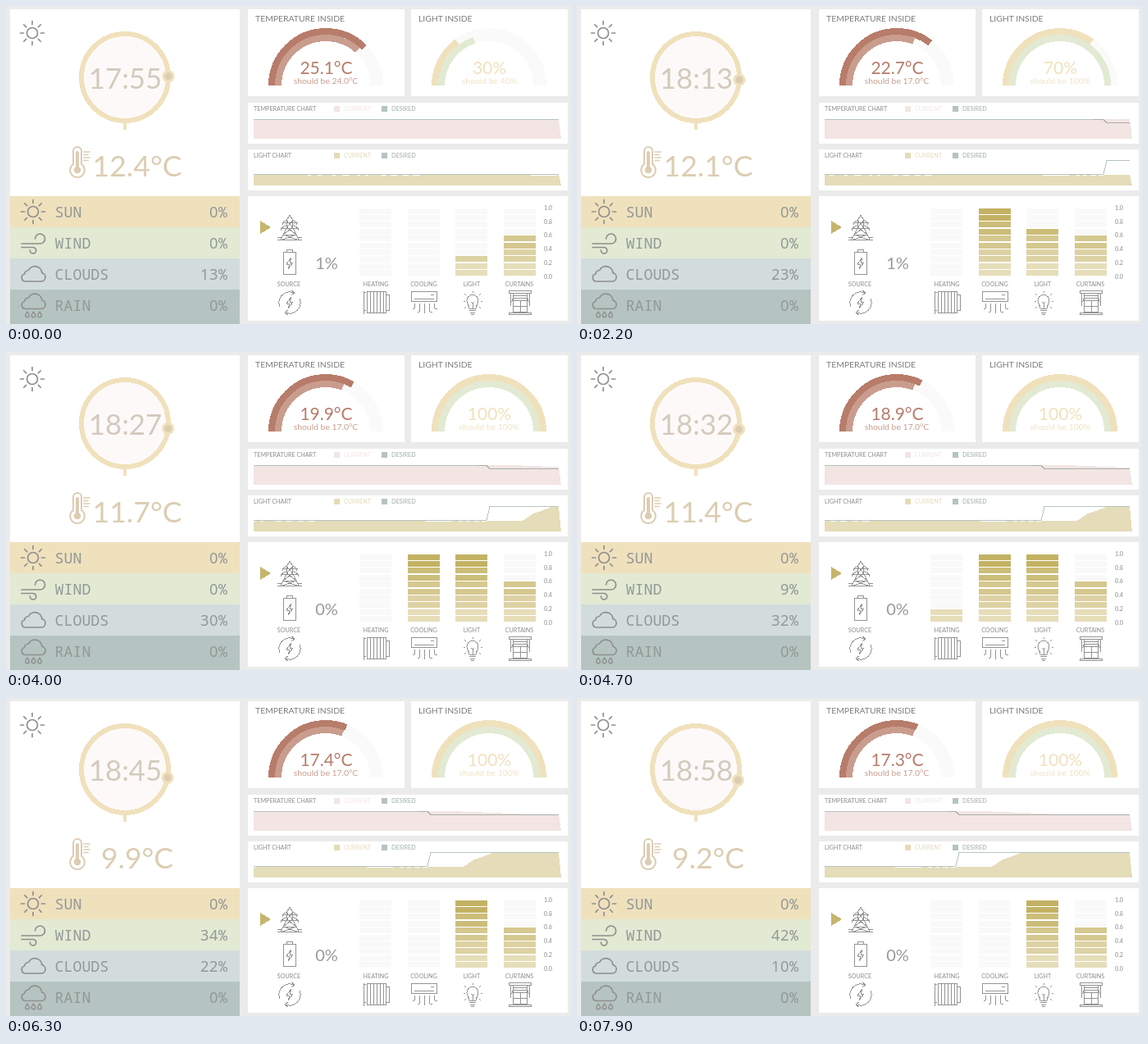
An HTML page that plays this animation: 689 by 388 pixels, repeating every 8000 ms.

```html
<!DOCTYPE html>
<html lang="en">
<head>
<meta charset="utf-8">
<title>Smart home dashboard</title>
<style>
html, body { margin: 0; width: 100%; height: 100%; overflow: hidden; background: #ebebeb; }
svg { display: block; width: 689px; height: 388px; }
text { font-family: Lato, "Open Sans", sans-serif; fill: #8c8c8c; }
.mid { text-anchor: middle; }
.title { font-size: 10.4px; fill: #7c7c7c; }
.big { font-size: 35.6px; text-anchor: middle; fill: #dccdb2; }
.value { font-size: 21px; text-anchor: middle; }
.note { font-size: 10.4px; text-anchor: middle; }
.small, .small text { font-size: 7.2px; }
.rows text { font: 18.3px "Noto Sans Mono", "DejaVu Sans Mono", monospace; fill: #929897; }
.rows .pct { text-anchor: end; }
.rows tspan { font-family: "Noto Sans", sans-serif; letter-spacing: .5px; }
.flat { shape-rendering: crispEdges; }
.icon { fill: none; stroke: #8f8f8f; stroke-width: 1.7; stroke-linecap: round; stroke-linejoin: round; }
.thin { stroke: #949494; stroke-width: 1; }
.arc { fill: none; stroke-width: 8; }
.line { fill: none; stroke: #b5c4c0; stroke-width: 1; mix-blend-mode: multiply; }
</style>
</head>
<body>
<svg viewBox="0 0 689 388">
  <defs>
    <clipPath id="plot"><rect x="302" y="120" width="372" height="104"/></clipPath>
    <path id="outer" d="M-66 0A66 66 0 0 1 66 0" pathLength="100"/>
    <path id="inner" d="M-58 0A58 58 0 0 1 58 0" pathLength="100"/>
    <path id="cloud" d="M24 336H43a5.2 5.2 0 0 0 .8-10.3A8.6 8.6 0 0 0 27.5 322.5A5.5 5.5 0 0 0 22.5 327A4.6 4.6 0 0 0 24 336Z"/>
    <path id="drop" d="M0-3.5C1-1.5 2.3-.5 2.3 1A2.3 2.3 0 0 1-2.3 1C-2.3-.5-1-1.5 0-3.5Z"/>
    <path id="bolt" d="M2-7L-4 1H0L-2 7L4-1H0Z"/>
    <g id="sun">
      <circle r="6.5"/>
      <path id="rays" d="M0-10.5V-14.5M0 10.5V14.5M-10.5 0H-14.5M10.5 0H14.5"/>
      <use href="#rays" transform="rotate(45)"/>
    </g>
  </defs>

  <g class="flat" fill="#fff">
    <path d="M5 4H285V388H5ZM295 4H486V110H295ZM494 4H685V110H494Z"/>
    <path d="M295 118H685V168H295ZM295 175H685V225H295ZM295 232H685V384H295Z"/>
    <path fill="#f0e1bd" d="M5 232H285V270H5Z"/>
    <path fill="#e2ead3" d="M5 270H285V308H5Z"/>
    <path fill="#d2dcdd" d="M5 308H285V346H5Z"/>
    <path fill="#b5c4c0" d="M5 346H285V388H5Z"/>
  </g>

  <!-- clock and weather -->
  <g class="icon"><use href="#sun" x="32" y="33"/></g>
  <g class="flat">
    <path d="M145 141V151" stroke="#f0e1bc" stroke-width="4"/>
    <circle cx="145" cy="87" r="53" fill="#fef9f9" stroke="#f0e1bc" stroke-width="6"/>
  </g>
  <g id="marker">
    <circle r="7.5" fill="#f0e1bc"/>
    <circle r="4.5" fill="#dccdb2"/>
  </g>
  <text id="clock" class="big" x="145.5" y="100.5" style="fill:#d3cabd;font-size:34.8px"></text>
  <g class="icon" style="stroke:#dccdb2">
    <path d="M82 193V177a5 5 0 0 1 10 0V193a8.8 8.8 0 1 1-10 0Z" stroke-width="2"/>
    <path d="M95 178H102M95 181.5H100M95 185H102M95 188.5H100"/>
    <path d="M87 179V198" stroke-width="4"/>
    <circle cx="87" cy="200" r="3.5" fill="#dccdb2"/>
  </g>
  <text id="outside" class="big" x="160" y="207.5"></text>

  <g class="icon">
    <use href="#sun" x="33" y="251"/>
    <path d="M19 290H41.5a6 6 0 1 0-6-6M19 294.5H33a3.7 3.7 0 1 1-3.7 3.7"/>
    <use href="#cloud"/>
    <use href="#cloud" y="33.5"/>
    <g stroke-width="1.4">
      <use href="#drop" x="26" y="376.5"/>
      <use href="#drop" x="33.5" y="376.5"/>
      <use href="#drop" x="41" y="376.5"/>
    </g>
  </g>
  <g class="rows">
    <text x="59.5" y="258">SUN</text><text class="pct" x="270" y="258"><tspan>0</tspan>%</text>
    <text x="59.5" y="296">WIND</text><text class="pct" x="270" y="296"><tspan id="wind"></tspan>%</text>
    <text x="59.5" y="334">CLOUDS</text><text class="pct" x="270" y="334"><tspan id="clouds"></tspan>%</text>
    <text x="59.5" y="372">RAIN</text><text class="pct" x="270" y="372"><tspan>0</tspan>%</text>
  </g>

  <!-- gauges -->
  <text class="title" x="304" y="19">TEMPERATURE INSIDE</text>
  <g class="arc flat" transform="translate(390 97)">
    <use href="#outer" stroke="#fafafa"/><use href="#inner" stroke="#fafafa"/>
    <use href="#inner" id="tempGoalArc" stroke="#c99d8e"/>
    <use href="#outer" id="tempArc" stroke="#b77c6a"/>
  </g>
  <text id="temp" class="value" x="390.5" y="83" style="fill:#b77c6a"></text>
  <text id="tempGoal" class="note" x="390" y="95" style="fill:#c99d8e"></text>

  <text class="title" x="503" y="19">LIGHT INSIDE</text>
  <g class="arc flat" transform="translate(589 97)">
    <use href="#outer" stroke="#fafafa"/><use href="#inner" stroke="#fafafa"/>
    <use href="#inner" id="lightGoalArc" stroke="#e2ead3"/>
    <use href="#outer" id="lightArc" stroke="#f0e1bd"/>
  </g>
  <text id="light" class="value" x="589.5" y="83" style="fill:#f0e1bd"></text>
  <text id="lightGoal" class="note" x="589.5" y="95" style="fill:#eee3c6"></text>

  <!-- charts -->
  <g class="small">
    <text x="302" y="128">TEMPERATURE CHART</text>
    <path class="flat" fill="#f2e5e3" d="M400 122h7v7h-7Z"/>
    <text x="412" y="128" style="fill:#f2e5e3">CURRENT</text>
    <path class="flat" fill="#b5c4c0" d="M458 122h7v7h-7Z"/>
    <text x="470" y="128" style="fill:#a0aeaa">DESIRED</text>
    <text x="302" y="185">LIGHT CHART</text>
    <path class="flat" fill="#e5dbb8" d="M400 179h7v7h-7Z"/>
    <text x="412" y="185" style="fill:#e5dbb8">CURRENT</text>
    <path class="flat" fill="#b5c4c0" d="M458 179h7v7h-7Z"/>
    <text x="470" y="185" style="fill:#a0aeaa">DESIRED</text>
  </g>
  <g class="flat">
    <path id="tempArea" fill="#f2e5e3"/>
    <path id="tempLine" class="line"/>
    <path id="lightArea" fill="#e5dcb9"/>
    <g clip-path="url(#plot)"><path id="dips" stroke="#fff" stroke-width="1"/></g>
    <path id="lightLine" class="line"/>
  </g>

  <!-- energy -->
  <path class="flat" d="M310 262L323 270L310 278Z" fill="#c6b56c"/>
  <g class="icon thin flat">
    <path d="M346 255L342.5 261V270L335 285M346 255L349.5 261V270L357 285M342.5 262L349.5 270M349.5 262L342.5 270M342.5 270L354 279M349.5 270L338 279M338 279L355 285M354 279L337 285M338 279H354"/>
    <path d="M342.5 261L337 264.5H355L349.5 261M342.5 267L335 271.5H357L349.5 267M337.5 265V267M354.5 265V267M335.5 272V274M356.5 272V274M331 285.5H361M331 282.5H336M356 282.5H361"/>
    <path d="M338.5 300.5H353.5V327.5H338.5ZM342.5 300V297.5H349.5V300"/>
    <use href="#bolt" x="346" y="314"/>
    <path d="M334 367A13 13 0 0 1 351 350M358 357A13 13 0 0 1 341 374M334 357A13 13 0 0 1 339 351M358 367A13 13 0 0 1 353 373M348 347L352 350L348 353M344 371L340 374L344 377"/>
    <use href="#bolt" x="346" y="362"/>
    <path d="M436 349.5H439M436 371.5H439M440.5 348.5H463.5V374.5H440.5ZM444.5 349V374M448.5 349V374M452.5 349V374M456.5 349V374M460.5 349V374M436.5 348V376M464 352.5H467.5V371.5H464"/>
    <path d="M494.5 348.5H525.5V360.5H494.5ZM498 357.5H522M518 352.5H522M498.5 363V367Q498.5 370 495.5 370M504.5 363V371Q504.5 374 501.5 374M510.5 363V375M516.5 363V371Q516.5 374 519.5 374M522.5 363V367Q522.5 370 525.5 370"/>
    <path d="M565 369C565 365 562 364 562 359.5A7 7 0 0 1 576 359.5C576 364 573 365 573 369ZM565.5 371.5H572.5M566 374H572M567.5 376.5H570.5M567 361L569 363L571 361M569 363V369"/>
    <path d="M569 350V348M561 353L559.5 351.5M577 353L578.5 351.5M559.5 360H557.5M578.5 360H580.5M561 367L559.5 368.5M577 367L578.5 368.5"/>
    <path d="M613.5 347.5H640.5V350.5H613.5ZM615.5 351V366M638.5 351V366M618 353.5H636M618 356.5H636M618 359.5H636M618.5 351V373.5H635.5V351M627 360V373M618 366.5H635M613.5 374H640.5V376.5H613.5ZM615 362Q619 360 618 352M639 362Q635 360 636 352"/>
  </g>
  <text id="battery" class="mid" x="391" y="321" style="font-size:20px;fill:#999"></text>
  <g class="small mid">
    <text x="345" y="342">SOURCE</text>
    <text x="451" y="342">HEATING</text>
    <text x="509.5" y="342">COOLING</text>
    <text x="568" y="342">LIGHT</text>
    <text x="626" y="342">CURTAINS</text>
    <g id="axis"></g>
  </g>
  <g id="bars" class="flat"></g>
</svg>

<script>
const $ = id => document.getElementById(id);
const clamp = (v, lo, hi) => Math.min(hi, Math.max(lo, v));

// Piecewise linear value through [x, y] knots, constant outside them.
function at(knots, x) {
  let [px, py] = knots[0];
  for (const [kx, ky] of knots) {
    if (x <= kx) return kx > px ? py + (ky - py) * Math.max(0, x - px) / (kx - px) : ky;
    [px, py] = [kx, ky];
  }
  return py;
}

// Runs of 100 ms ticks during which the clock advances one minute per tick.
const runs = [[1, 5], [7, 9], [11, 15], [17, 20], [22, 24], [29, 30], [32, 36], [38, 40],
  [42, 45], [47, 51], [53, 55], [57, 60], [62, 66], [68, 71], [73, 75], [77, 79]];
// Two more minutes pass unseen during the long pause before tick 29.
const minuteAt = tick => runs.reduce((m, [a, b]) => m + clamp(tick - a + 1, 0, b - a + 1), tick >= 29 ? 2 : 0);

// Readings by minutes since 17:55.
const outside = [[0, 12.4], [26, 11.92], [35, 11.63], [50, 9.89], [63, 9.2]];
const inside = [[0, 25.1], [6, 25.2], [10, 24.4], [18, 22.7], [26, 21.1], [37, 18.9], [44, 17.6], [48, 17.42], [59, 17.34], [63, 17.3]];
const clouds = [[0, 13], [10, 19], [18, 23], [26, 27], [38, 32.4], [50, 22], [63, 10]];
const wind = [[32, 0], [37, 9], [50, 34], [63, 42]];
const lightSteps = [3, 14, 16, 18, 22, 24, 26];

// Chart heights by x at minute 0; charts scroll 4 px per minute.
const tempNow = [[690, 139], [714, 138], [750, 138.2], [835, 141.8]];
const tempWant = [[714, 138.5], [718, 142.5]];
const lightNow = [[759, 205.5], [769, 198], [783, 193], [795, 188.5]];
const lightWant = [[714, 205.5], [718, 188.5]];
const dips = [[368, 4], [380, 5], [398, 4], [410, 9], [428, 4], [438, 4], [457, 7], [469, 8], [484, 7], [496, 9],
  [640, 32], [680, 5], [689, 5], [698, 7], [708, 6]];

const svg = (tag, attrs, parent) => {
  const el = document.createElementNS("http://www.w3.org/2000/svg", tag);
  for (const k in attrs) el.setAttribute(k, attrs[k]);
  return parent.appendChild(el);
};

const bars = [431, 490, 548, 607].map(x =>
  Array.from({ length: 10 }, (_, i) =>
    svg("rect", { x, y: Math.round(322 - i * 8.365), width: 39, height: 7 }, $("bars"))));
for (let i = 0; i <= 5; i++) {
  svg("text", { x: 661, y: 332.5 - i * 16.7 }, $("axis")).textContent = (i / 5).toFixed(1);
}

// Segments darken in pairs from bottom to top.
const mix = (a, b, t) => Math.round(a + (b - a) * t);
const shade = i => {
  const t = Math.floor(i / 2) / 4;
  return `rgb(${mix(230, 195, t)},${mix(221, 178, t)},${mix(185, 100, t)})`;
};
const fillBar = (bar, n) => bar.forEach((r, i) => r.setAttribute("fill", i < n ? shade(i) : "#f9f9f9"));
const sweep = (id, f) => $(id).setAttribute("stroke-dasharray", `${f * 100} 200`);
const say = (id, s) => { $(id).textContent = s; };

function trace(knots, m) {
  let d = "";
  for (let x = 302; x <= 674; x += 4) d += `${d ? "L" : "M"}${x} ${at(knots, x + 4 * m).toFixed(2)}`;
  return d;
}
const area = (id, knots, m, base) => $(id).setAttribute("d", `${trace(knots, m)}L677 ${base}H302Z`);
const line = (id, knots, m) => $(id).setAttribute("d", trace(knots, m));

function draw(m) {
  const minutes = 17 * 60 + 55 + m;
  const angle = (minutes - 18 * 60) * Math.PI / 720;
  say("clock", `${Math.floor(minutes / 60)}:${String(minutes % 60).padStart(2, "0")}`);
  $("marker").setAttribute("transform", `translate(${145 + 53 * Math.cos(angle)} ${87 + 53 * Math.sin(angle)})`);
  say("outside", at(outside, m).toFixed(1) + "°C");
  say("wind", Math.round(at(wind, m)));
  say("clouds", Math.round(at(clouds, m)));

  const temp = at(inside, m), tempGoal = m < 5 ? 24 : 17;
  const light = 30 + 10 * lightSteps.filter(s => m >= s).length, lightGoal = m < 5 ? 40 : 100;
  say("temp", temp.toFixed(1) + "°C");
  say("tempGoal", `should be ${tempGoal.toFixed(1)}°C`);
  sweep("tempArc", (temp + 20) / 60);
  sweep("tempGoalArc", (tempGoal + 20) / 60);
  say("light", light + "%");
  say("lightGoal", `should be ${lightGoal}%`);
  sweep("lightArc", light / 100);
  sweep("lightGoalArc", lightGoal / 100);

  area("tempArea", tempNow, m, 162);
  line("tempLine", tempWant, m);
  area("lightArea", lightNow, m, 219);
  line("lightLine", lightWant, m);
  $("dips").setAttribute("d", dips.map(([x, w]) => `M${x - 4 * m} 206.5h${w}`).join(""));

  say("battery", m < 22 ? "1%" : "0%");
  fillBar(bars[0], m >= 35 && m < 41 ? 2 : 0);
  fillBar(bars[1], m >= 6 && m < 45 ? 10 : 0);
  fillBar(bars[2], light / 10);
  fillBar(bars[3], 6);
}

let shown = -1;
function frame() {
  const m = minuteAt(Math.floor(performance.now() % 8000 / 100));
  if (m !== shown) draw(shown = m);
  requestAnimationFrame(frame);
}
frame();
</script>
</body>
</html>
```
